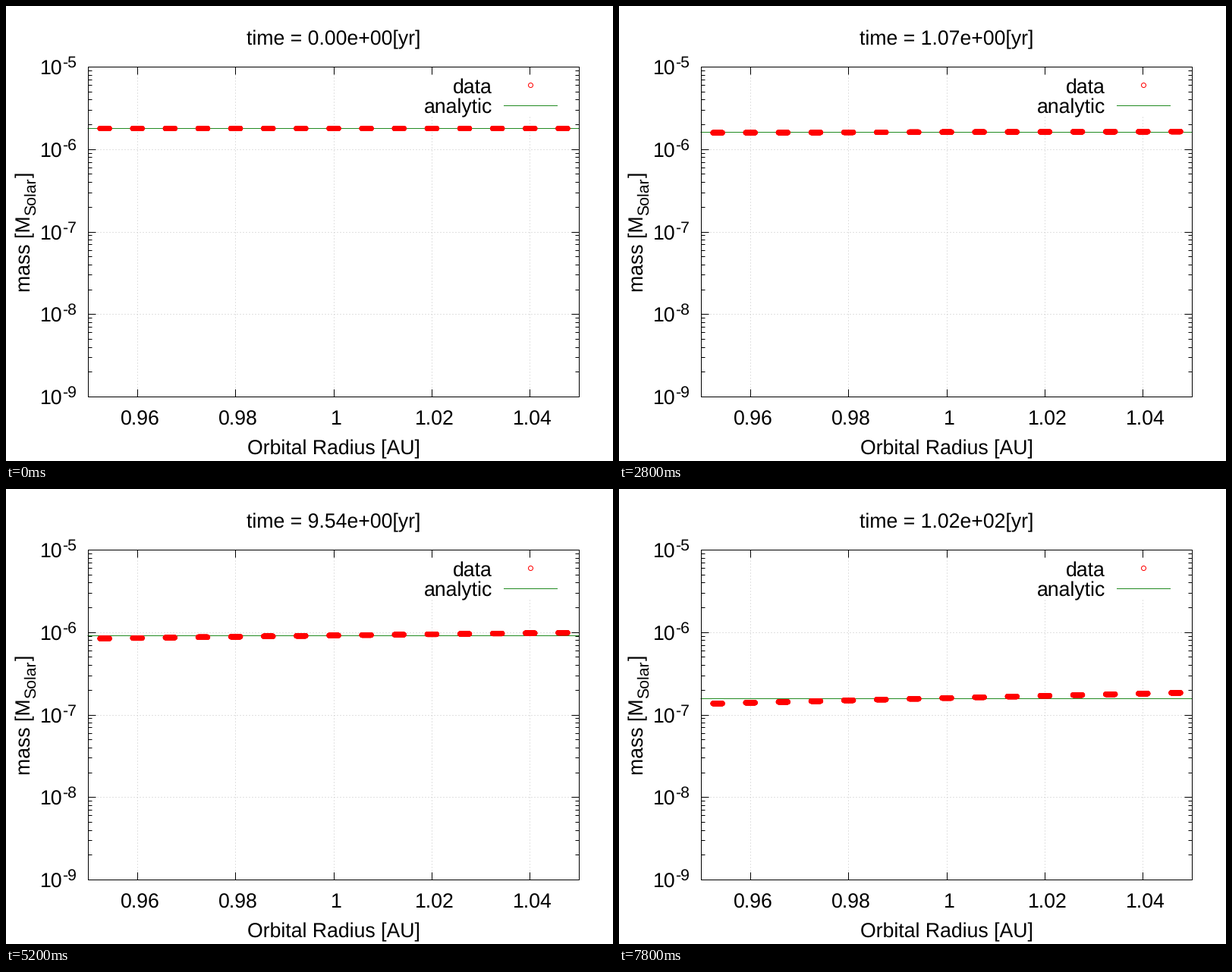
Write a matplotlib script that moves like this. It is 800 px wide and 600 px high and loops after 8000 ms.

```python
import numpy as np
import matplotlib.pyplot as plt
from matplotlib.animation import FuncAnimation
from matplotlib.collections import EllipseCollection
from matplotlib.patches import Rectangle

plt.rcParams["font.family"] = ["Liberation Sans", "DejaVu Sans"]
plt.rcParams["text.hinting"] = "none"
plt.rcParams["toolbar"] = "None"

DPI = 100
PX = 72 / DPI                       # points per pixel
LEFT, RIGHT, TOP, BOTTOM = 108.5, 755.5, 80.5, 515.5
DECADE = (BOTTOM - TOP) / 4
SIZE, SMALL = 26.67, 21.33          # font sizes in pixels
RED, GREEN = "#ff0000", "#228b22"
M0, TAU = 1.8e-6, 10.0              # initial mass, decay time in years
FRAMES, STEP = 40, 200
PER_RING = 90

fig = plt.figure(figsize=(800 / DPI, 600 / DPI), dpi=DPI, facecolor="white")
ax = fig.add_axes([0, 0, 1, 1])
ax.set_xlim(0, 800)
ax.set_ylim(600, 0)
ax.axis("off")


def x_pos(r):
    return LEFT + (r - 0.95) * (RIGHT - LEFT) / 0.1


def y_pos(mass):
    return TOP + (-5 - np.log10(mass)) * DECADE


def snap(v):
    """Centre of the pixel that holds v."""
    return np.floor(v) + 0.5


def line(xs, ys, color="black", **kw):
    kw = {"lw": PX, "solid_capstyle": "butt", "snap": False, **kw}
    return ax.plot(xs, ys, color=color, **kw)[0]


def label(x, y, s, size=SIZE, ha="center", **kw):
    return ax.text(x, y, s, fontsize=size * PX, ha=ha, va="baseline",
                   color="black", zorder=6, **kw)


def circles(xs, ys, zorder):
    rings = EllipseCollection(6, 6, 0, units="xy", facecolors="none",
                              edgecolors=RED, linewidths=PX, zorder=zorder,
                              offsets=np.column_stack([xs, ys]),
                              transOffset=ax.transData) \
        if False else EllipseCollection([6], [6], [0], units="xy",
                                        facecolors="none", edgecolors=RED,
                                        linewidths=PX, zorder=zorder,
                                        offsets=np.column_stack([xs, ys]),
                                        offset_transform=ax.transData)
    rings.set_snap(False)
    ax.add_collection(rings, autolim=False)
    return rings


def draw_axes():
    dots = dict(color="#c4c4c4", zorder=1, dashes=(1, 3), dash_capstyle="butt")
    for r in (0.96, 0.98, 1.0, 1.02, 1.04):
        x = snap(x_pos(r))
        line([x, x], [BOTTOM, TOP], **dots)
        line([x, x], [BOTTOM, BOTTOM - 10], zorder=5)
        line([x, x], [TOP, TOP + 10], zorder=5)
        label(x + 3, 552.5, f"{r:g}")

    for k in range(5):
        y = snap(TOP + k * DECADE)
        if 0 < k < 4:
            line([LEFT, RIGHT], [y, y], **dots)
        line([LEFT, LEFT + 10], [y, y], zorder=5)
        line([RIGHT, RIGHT - 10], [y, y], zorder=5)
        label(44.6, y + 10, "10", ha="left")
        label(74.3, y + 0.5, f"-{k + 5}", SMALL, "left")
        if k < 4:
            for n in range(2, 10):
                ym = snap(TOP + (k + 1 - np.log10(n)) * DECADE)
                line([LEFT, LEFT + 5], [ym, ym], zorder=5)
                line([RIGHT, RIGHT - 5], [ym, ym], zorder=5)

    ax.add_patch(Rectangle((LEFT, TOP), RIGHT - LEFT, BOTTOM - TOP, fill=False,
                           ec="black", lw=PX, joinstyle="miter", zorder=5,
                           snap=False))
    label(432, 591.5, "Orbital Radius [AU]")
    up = dict(ha="left", rotation=90, rotation_mode="anchor")
    label(32.5, 377, "mass [M", **up)
    label(38.5, 276.2, "Solar", SMALL, **up)
    label(32.5, 226.4, "]", **up)


def draw_key():
    ax.add_patch(Rectangle((540, 91), 200, 54, fc="white", ec="none", zorder=2))
    label(640.7, 115, "data", ha="right")
    label(640.7, 141, "analytic", ha="right")
    circles([691.5], [104.5], 4)
    line([656, 727], [131.5, 131.5], GREEN, zorder=4)


draw_axes()
draw_key()
title = label(432, 51, "")
theory = line([LEFT - 1, RIGHT], [0, 0], GREEN, zorder=2.5)

# fifteen rings, each a tight row of particles
rings = 0.95 + (np.arange(15) + 0.5) / 150
spread = np.linspace(-6.2, 6.2, PER_RING)
xs = (x_pos(rings)[:, None] + spread).ravel()
radii = np.repeat(rings, PER_RING)
points = circles(xs, 0 * xs, 3)


def mass_at(t, r=1.0):
    return M0 / (1 + t / (TAU * r ** 3.5))


def update(i):
    t = 0.1 * 1.2 ** (i - 1) if i else 0.0
    title.set_text(f"time = {t:.2e}[yr]")
    points.set_offsets(np.column_stack([xs, y_pos(mass_at(t, radii))]))
    y = snap(y_pos(mass_at(t)) + 0.4)
    theory.set_ydata([y, y])
    return title, points, theory


anim = FuncAnimation(fig, update, frames=FRAMES, interval=STEP,
                     init_func=lambda: update(0), repeat=True, repeat_delay=0)
plt.show()
```
